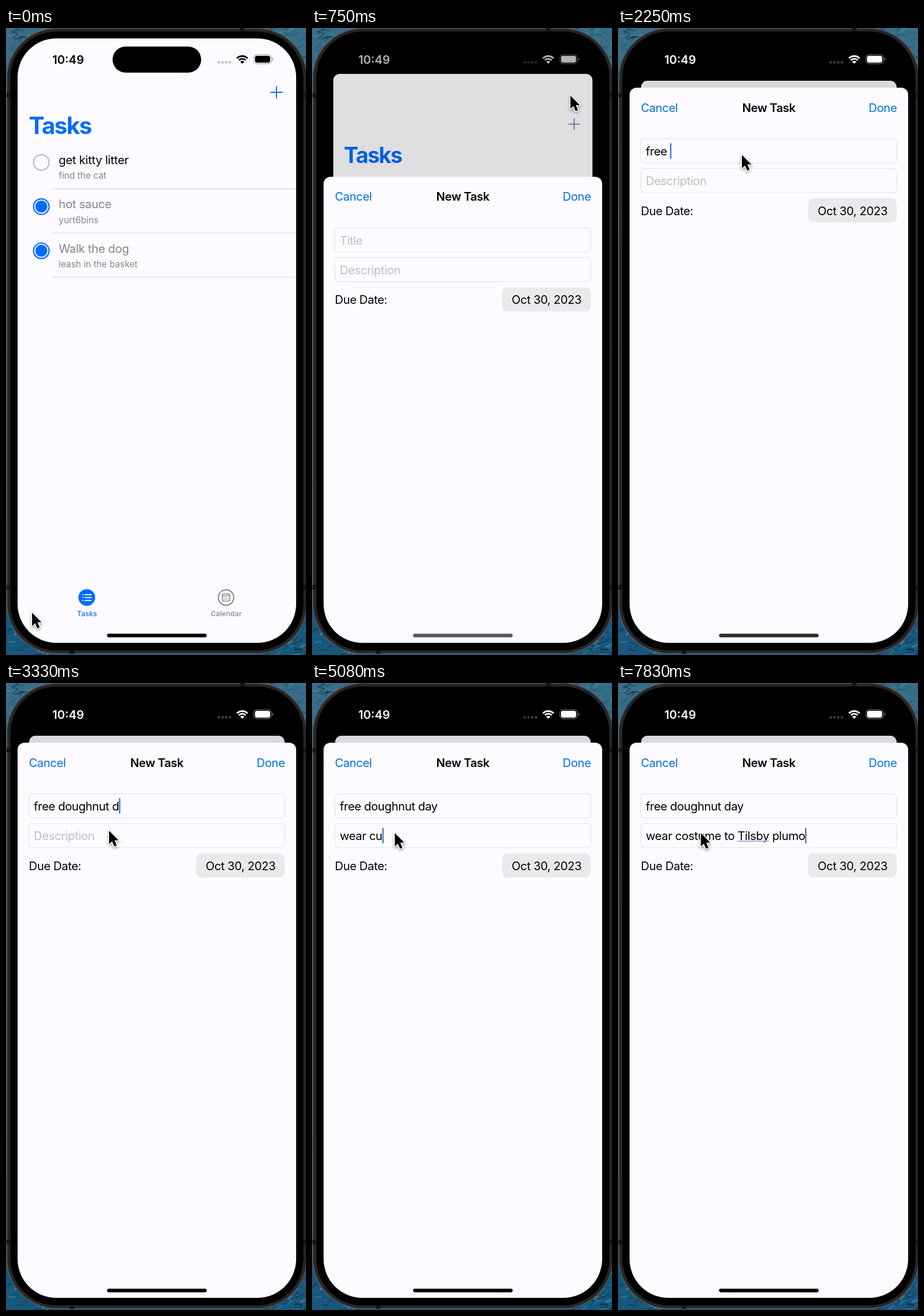
An HTML page with a canvas for the animation above (8000 ms loop, 518x1082 px).

```html
<!DOCTYPE html>
<html lang="en">
<head>
<meta charset="utf-8">
<title>New task</title>
<style>
  html, body { margin: 0; width: 100%; height: 100%; overflow: hidden; background: #000; }
  canvas { display: block; }
</style>
</head>
<body>
<canvas id="stage" width="518" height="1082"></canvas>
<script>
const LOOP = 8000, STEP = 1000 / 12;
const W = 518, H = 1082;
const SCREEN = [20, 18, 481, 1043, 67];
const PAPER = '#fdfbff', BLUE = [0, 108, 255], FADED = [108, 134, 156], GREY = '#868488';
const TITLE = 'free doughnut day', NOTE = 'wear costume to Tilsby plumo';
const BODY = { size: 20.2, spacing: -0.4 };

const stage = document.getElementById('stage').getContext('2d');
let ctx = stage;

const clamp = v => Math.max(0, Math.min(1, v));
const smooth = v => v * v * (3 - 2 * v);
const ramp = (t, from, to) => clamp((t - from) / (to - from));
const rgb = channels => `rgb(${channels.map(Math.round)})`;
const mix = (a, b, k) => rgb(a.map((v, i) => v + (b[i] - v) * k));
const grey = v => rgb([v, v, v]);

// Interpolates rows of [time, ...values].
function track(keys, t, ease = v => v) {
  let i = 0;
  while (i < keys.length - 2 && t >= keys[i + 1][0]) i++;
  const [a, b] = [keys[i], keys[i + 1]];
  const k = ease(ramp(t, a[0], b[0]));
  return a.slice(1).map((v, n) => v + (b[n + 1] - v) * k);
}

function box(x, y, w, h, r, fill, stroke, lineWidth = 1.2) {
  ctx.beginPath();
  ctx.roundRect(x, y, w, h, r);
  if (fill) { ctx.fillStyle = fill; ctx.fill(); }
  if (stroke) { ctx.strokeStyle = stroke; ctx.lineWidth = lineWidth; ctx.stroke(); }
}

function disc(x, y, r, fill, stroke, lineWidth) {
  box(x - r, y - r, 2 * r, 2 * r, r, fill, stroke, lineWidth);
}

function line(points, color, width, cap = 'butt') {
  ctx.beginPath();
  points.forEach(([x, y]) => ctx.lineTo(x, y));
  ctx.strokeStyle = color;
  ctx.lineWidth = width;
  ctx.lineCap = cap;
  ctx.stroke();
}

function setFont({ size = BODY.size, weight = 400, spacing = BODY.spacing }) {
  ctx.font = `${weight} ${size}px Inter, sans-serif`;
  ctx.letterSpacing = spacing + 'px';
}

function text(str, x, y, color, style = {}) {
  setFont(style);
  ctx.textAlign = style.align || 'left';
  ctx.fillStyle = color;
  ctx.fillText(str, x, y);
}

function textWidth(str) {
  setFont(BODY);
  return ctx.measureText(str).width;
}

function paintBackdrop() {
  let seed = 7;
  const random = () => (seed = seed * 16807 % 2147483647) / 2147483647;
  const paints = ['#1d5b85', '#2c7ba3', '#123f60', '#3f8f9d', '#0f3048', '#7f9a94', '#1b6a92'];
  const base = ctx.createLinearGradient(0, 0, 0, H);
  base.addColorStop(0, '#3b6d86');
  base.addColorStop(1, '#17577c');
  ctx.fillStyle = base;
  ctx.fillRect(0, 0, W, H);
  ctx.globalAlpha = 0.6;
  for (let i = 0; i < 360; i++) {
    const x = (i & 1 ? W - 70 : 0) + random() * 70;
    const y = (i & 2 ? H - 80 : 0) + random() * 80;
    const angle = random() * 1.2 - 0.9;
    line([[x, y], [x + 11 * Math.cos(angle), y + 11 * Math.sin(angle)]],
      paints[Math.floor(random() * paints.length)], 1 + random() * 2, 'round');
  }
  ctx.globalAlpha = 1;
  box(1.5, 0.5, 518, 1079, 86, '#262627', '#59595b', 1.4);
  ctx.fillStyle = '#161617';
  [[1, 112, 7, 8], [1, 961, 7, 8], [511, 112, 7, 8], [511, 961, 7, 8], [404, 0, 8, 7], [110, 1072, 8, 8]]
    .forEach(r => ctx.fillRect(...r));
  box(7.5, 6, 506, 1068, 80, '#000');
}

function drawCheck(y, done, tint) {
  disc(61, y, 13.4, null, done ? tint : '#bcbabe', 2.2);
  if (done) disc(61, y, 10.4, tint);
}

function drawTabs() {
  const blue = rgb(BLUE);
  const label = { size: 12, weight: 500, spacing: 0.2, align: 'center' };
  disc(139.5, 982.8, 14.4, blue);
  for (const y of [977.8, 982.8, 987.8]) {
    disc(132.8, y, 1.1, '#fff');
    line([[136.3, y], [147.3, y]], '#fff', 1.7, 'round');
  }
  text('Tasks', 140, 1014.5, blue, label);

  disc(380, 982.8, 13.3, null, GREY, 2);
  box(373.5, 976.5, 13, 12.6, 2.4, null, GREY, 1.4);
  line([[373.5, 979.4], [386.5, 979.4]], GREY, 1.4);
  for (let i = 0; i < 12; i++) disc(376 + i % 4 * 2.7, 981.8 + Math.floor(i / 4) * 2.4, 0.75, GREY);
  text('Calendar', 380.3, 1014.5, GREY, label);
}

function drawTaskPage(p) {
  const tint = mix(BLUE, FADED, p);
  ctx.save();
  ctx.translate(260.5, 18 + 73 * p);
  ctx.scale(1 - 0.083 * p, 1 - 0.083 * p);
  ctx.translate(-260.5, -18);
  box(20, 18, 481, 1043, 12, PAPER);
  ctx.clip();
  line([[456.5, 111], [477.5, 111]], tint, 1.9);
  line([[467, 100.5], [467, 121.5]], tint, 1.9);
  text('Tasks', 39.5, 183, rgb(BLUE), { size: 40.4, weight: 700, spacing: -1.7 });
  [['get kitty litter', 'find the cat'], ['hot sauce', 'yurt6bins'], ['Walk the dog', 'leash in the basket']]
    .forEach(([name, detail], i) => {
      const y = 232 + i * 76.2;
      drawCheck(y, i > 0, tint);
      text(name, 91, y + 3.2, i ? GREY : '#000', { spacing: -0.28 });
      text(detail, 91, y + 28.3, GREY, { size: 15.4, spacing: 0 });
      line([[78.5, y + 45.7], [501, y + 45.7]], '#dcdade', 1.2);
    });
  drawTabs();
  ctx.fillStyle = `rgba(0,0,0,${0.14 * p})`;
  ctx.fillRect(20, 18, 481, 1043);
  ctx.restore();
}

function drawStatus(p) {
  const level = 255 * ramp(p, 0.52, 0.98);
  const ink = grey(level);
  text('10:49', 107.3, 61.8, ink, { weight: 600, spacing: 0, align: 'center' });
  const dots = p < 0.5 ? 188 * (1 - 2 * p) : 60 * (2 * p - 1);
  for (let i = 0; i < 4; i++) disc(367.3 + i * 6.5, 59.3, 2.3, grey(dots));

  ctx.strokeStyle = ctx.fillStyle = ink;
  ctx.lineCap = 'butt';
  ctx.lineWidth = 2.9;
  for (const r of [8.4, 13]) {
    ctx.beginPath();
    ctx.arc(408, 61.5, r, -Math.PI * 0.75, -Math.PI * 0.25);
    ctx.stroke();
  }
  ctx.beginPath();
  ctx.moveTo(408, 61.8);
  ctx.arc(408, 61.8, 5, -Math.PI * 0.75, -Math.PI * 0.25);
  ctx.fill();

  const rim = p < 0.5 ? '#a3a1a5' : grey(level * 0.42);
  box(428, 46.2, 30, 15.4, 5, null, rim, 1.2);
  box(430, 48.1, 26, 11.6, 3.4, ink);
  box(459.6, 51.4, 1.8, 5, 1, rim);
  box(184, 32, 153, 45, 22.5, '#000');
}

function drawField(y, value, placeholder, focused) {
  box(39.5, y, 442, 41.6, 6, null, '#e6e4e8');
  text(value || placeholder, 48, y + 28.7, value ? '#000' : '#bfbdc1');
  if (focused) {
    ctx.fillStyle = '#3a69cf';
    ctx.fillRect(48 + textWidth(value), y + 7.8, 2.2, 26.5);
  }
}

function typedTitle(t) {
  return TITLE.slice(0, Math.floor(TITLE.length * ramp(t, 1700, 3500)));
}

function typedNote(t) {
  const [count] = track([[4170, 0], [4660, 5], [4830, 6], [5410, 7], [6300, 15], [6420, 15],
    [6830, 19], [6920, 19], [7740, 26], [7820, 28]], t);
  const slip = t > 4980 && t < 5240 ? 'u' : '';
  return NOTE.slice(0, Math.floor(count + 0.001)) + slip;
}

function drawSheet(t, p) {
  const link = '#0070e0';
  const note = typedNote(t);
  ctx.save();
  ctx.translate(0, 958 * (1 - p));
  box(20, 103, 481, 1000, 12, PAPER);
  text('Cancel', 39.5, 144.5, link);
  text('New Task', 260.5, 144.5, '#000', { weight: 600, align: 'center' });
  text('Done', 481.5, 144.5, link, { align: 'right' });
  drawField(191.2, typedTitle(t), 'Title', t > 1320 && t < 3740);
  drawField(242.4, note, 'Description', t >= 3740);
  const start = NOTE.indexOf('Tilsby'), end = start + 6;
  if (note.length > end) {
    const left = 48 + textWidth(NOTE.slice(0, start)), right = 48 + textWidth(NOTE.slice(0, end));
    line([[left, 273], [right, 273]], '#9fb6e6', 1.8);
  }
  text('Due Date:', 39.5, 322.5, '#000');
  box(328.3, 293.8, 153, 41.6, 9, '#ebe9ec');
  text('Oct 30, 2023', 405, 322.5, '#000', { align: 'center' });
  ctx.restore();
}

function drawPointer(t) {
  const [x, y] = track([[40, 45, 1009], [480, 462, 110], [680, 461, 110], [1150, 214, 219],
    [3000, 214, 219], [3300, 178, 255], [3420, 178, 255], [3750, 143, 259]], t, smooth);
  const shape = new Path2D('M0 0V23L5.2 18.2L9.1 27L13.2 25.2L9.4 16.6H16.4Z');
  ctx.save();
  ctx.translate(x, y);
  ctx.lineJoin = 'round';
  ctx.lineWidth = 3;
  ctx.strokeStyle = '#fff';
  ctx.shadowColor = 'rgba(0,0,0,.4)';
  ctx.shadowBlur = 4;
  ctx.shadowOffsetY = 2;
  ctx.stroke(shape);
  ctx.shadowColor = 'transparent';
  ctx.fillStyle = '#000';
  ctx.fill(shape);
  ctx.restore();
}

const backdrop = document.createElement('canvas');
backdrop.width = W;
backdrop.height = H;
ctx = backdrop.getContext('2d');
paintBackdrop();
ctx = stage;

function draw(t) {
  // Critically damped spring.
  const spring = Math.max(0, t - 500) * 0.01314;
  const p = t > 1130 ? 1 : 1 - (1 + spring) * Math.exp(-spring);
  ctx.drawImage(backdrop, 0, 0);
  ctx.save();
  box(...SCREEN, '#000');
  ctx.clip();
  drawTaskPage(p);
  drawStatus(p);
  if (p > 0) drawSheet(t, p);
  const bar = 88 * (ramp(t, 500, 670) - ramp(t, 1900, 2600));
  box(174.5, 1045.2, 172, 6.2, 3.1, grey(bar));
  ctx.restore();
  drawPointer(t);
}

function tick() {
  const now = performance.now() % LOOP;
  draw(Math.floor((now + 4) / STEP) * STEP);
  requestAnimationFrame(tick);
}
tick();
</script>
</body>
</html>
```
